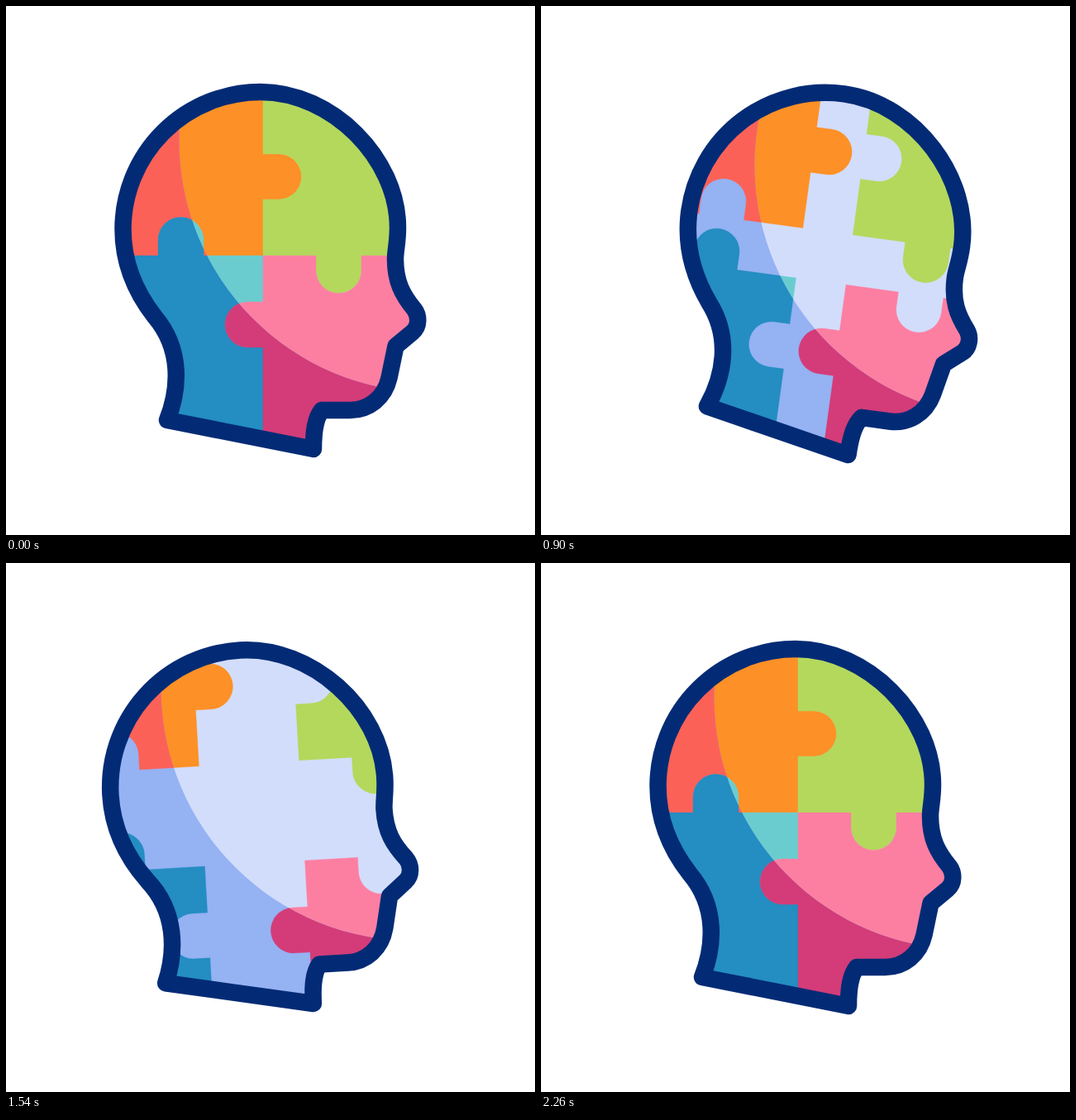
Recreate the animation shown at these times as an HTML page. Size 640 by 640 pixels, loop 2.4 s.

```html
<!DOCTYPE html>
<html lang="en">
<head>
<meta charset="utf-8">
<title>Puzzle head</title>
<style>
  html, body { margin: 0; width: 100%; height: 100%; overflow: hidden; background: #fff; }
  svg { display: block; width: 100%; height: 100%; }
</style>
</head>
<body>
<svg viewBox="0 0 640 640">
  <defs>
    <path id="outline" d="M195 501 C210 463 213 415 180 376 C155 344 141.5 309 141.5 270
      A166.5 166 0 0 1 308 104 C395 104 474 185 474 268
      C474 287 471 296 471 306 C471 334 480 350 494 367
      C500 375 500 388 492 394.500 L471.500 411.500 L463.500 450 C458 474 439 489 416 489
      L382 489 C374 499 372 515 372 536 Z"/>
    <clipPath id="inside"><use href="#outline"/></clipPath>
    <clipPath id="shadow">
      <path clip-rule="evenodd" d="M-100 -200 H900 V900 H-100 Z
        M209.500 162.700 a305 305 0 1 0 610 0 a305 305 0 1 0 -610 0 Z"/>
    </clipPath>
  </defs>
  <g id="head">
    <g clip-path="url(#inside)">
      <g id="lit"></g>
      <g id="dim" clip-path="url(#shadow)"></g>
    </g>
    <use href="#outline" fill="none" stroke="#032b75" stroke-width="20.5" stroke-linejoin="round"/>
  </g>
</svg>
<script>
const LOOP = 2400, STEP = 20;
const PIVOT = '320 536';

// Keys are [time, value]
const TILT = [[200, 0], [800, 9], [1400, -7], [1800, 6.1], [2200, 0]];
const SPREAD = [[200, 0], [1600, 61], [2200, 0]];

const arc = (sweep, dx, dy) => `a27.5 27.5 0 0 ${sweep} ${dx} ${dy}`;
const topJoint = `M311 302 V234 h19 ${arc(0, 0, -55)} h-19 V0`;
const bottomJoint = `V640 H311 V413 h-18.5 ${arc(1, 0, -55)} h18.5 Z`;

const PIECES = [
  { dir: [-1, -1], lit: '#fd9026', dim: '#fc6157',
    d: `${topJoint} H0 V302 H184 V283 ${arc(1, 55, 0)} V302 Z` },
  { dir: [1, -1], lit: '#b3d85c', dim: '#b3d85c',
    d: `${topJoint} H640 V302 H430 V320 ${arc(1, -55, 0)} V302 Z` },
  { dir: [-1, 1], lit: '#6bcccf', dim: '#248dc1',
    d: `M311 302 H239 V283 ${arc(0, -55, 0)} V302 H0 ${bottomJoint}` },
  { dir: [1, 1], lit: '#fc7fa2', dim: '#d33c78',
    d: `M311 302 H375 V320 ${arc(0, 55, 0)} V302 H640 ${bottomJoint}` }
];

const byId = id => document.getElementById(id);
const head = byId('head');

function addPath(parent, d, color) {
  const path = document.createElementNS('http://www.w3.org/2000/svg', 'path');
  path.setAttribute('d', d);
  path.setAttribute('fill', color);
  // A thin edge hides hairlines between closed pieces
  path.setAttribute('stroke', color);
  path.setAttribute('stroke-width', 0.4);
  parent.append(path);
  return path;
}

const parts = [];
for (const [layer, back] of [['lit', '#d2ddfb'], ['dim', '#95b2f3']]) {
  const group = byId(layer);
  addPath(group, 'M0 0 H640 V640 H0 Z', back);
  for (const piece of PIECES) {
    parts.push({ path: addPath(group, piece.d, piece[layer]), dir: piece.dir });
  }
}

const smooth = p => p * p * (3 - 2 * p);

function valueAt(keys, t) {
  if (t <= keys[0][0]) return keys[0][1];
  for (let i = 1; i < keys.length; i++) {
    const [t0, a] = keys[i - 1], [t1, b] = keys[i];
    if (t < t1) return a + (b - a) * smooth((t - t0) / (t1 - t0));
  }
  return keys[keys.length - 1][1];
}

function draw(t) {
  const spread = valueAt(SPREAD, t);
  head.setAttribute('transform', `rotate(${valueAt(TILT, t)} ${PIVOT})`);
  for (const { path, dir: [x, y] } of parts) {
    path.setAttribute('transform', `translate(${x * spread} ${y * spread})`);
  }
}

const start = performance.now();
function tick() {
  const t = (performance.now() - start) % LOOP;
  draw(Math.floor(t / STEP) * STEP);
  requestAnimationFrame(tick);
}
tick();
</script>
</body>
</html>
```
